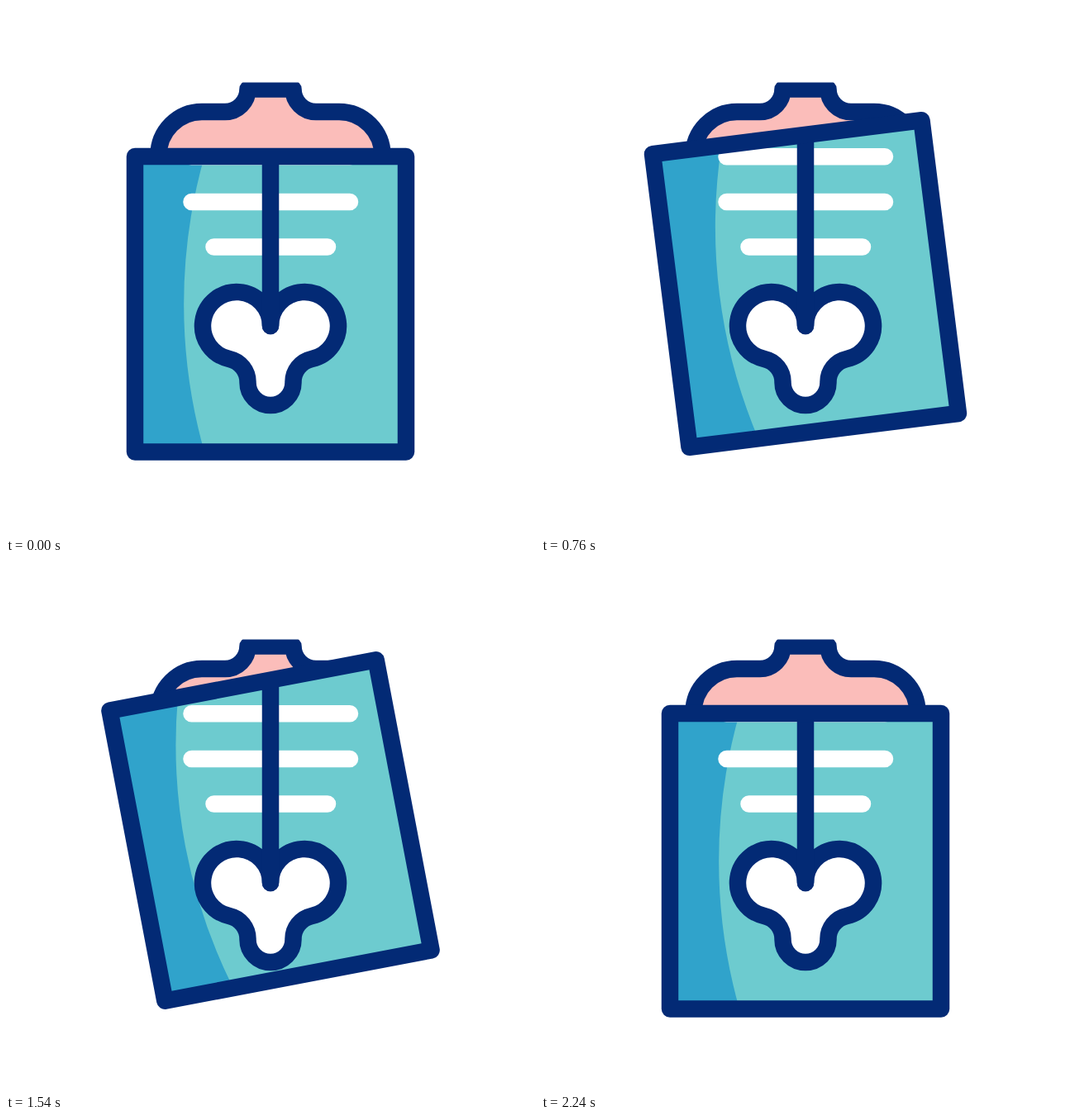
Animation, 640 px wide and 640 px high, one loop 2.4 s. Source, as an HTML page:

```html
<!DOCTYPE html>
<html lang="en">
<head>
<meta charset="utf-8">
<title>X-ray panel</title>
<style>
  html, body { margin: 0; width: 100%; height: 100%; overflow: hidden; background: #fff; }
  svg { display: block; width: 100%; height: 100%; }
  .line { fill: none; stroke: #032a75; stroke-width: 20.5; stroke-linecap: round; stroke-linejoin: round; }
  .rib { fill: none; stroke: #fff; stroke-width: 20.5; stroke-linecap: round; }
</style>
</head>
<body>
<svg viewBox="0 0 640 640">
  <defs>
    <clipPath id="neckCut"><rect y="92.5" width="640" height="548"/></clipPath>
    <clipPath id="screen"><rect class="tilt" x="-164" y="-178.75" width="328" height="357.5"/></clipPath>
  </defs>

  <g clip-path="url(#neckCut)">
    <path class="line" style="fill:#fbbdba" d="M184.5 181A52.5 53 0 0 1 237 128H265A27.5 27.5 0 0 0 292.5 100.5H347.5A27.5 27.5 0 0 0 375 128H403A52.5 53 0 0 1 455.5 181"/>
  </g>

  <g class="tilt">
    <rect x="-164" y="-178.75" width="328" height="357.5" fill="#6dcbcf"/>
    <path fill="#30a3cb" d="M-164-178.75H-80A656 656 0 0 0-80 178.75H-164Z"/>
  </g>

  <g clip-path="url(#screen)">
    <path class="rib" d="M224.5 182.3H416M224.5 237H416M251.5 291.5H389"/>
    <path class="line" style="fill:#fff" d="M320 387A41 41 0 1 0 270 427A28.5 28.5 0 0 1 292.5 455.5A27.5 27.5 0 0 0 347.5 455.5A28.5 28.5 0 0 1 370 427A41 41 0 1 0 320 387"/>
    <path class="line" d="M320 90V387"/>
  </g>

  <rect class="tilt line" x="-164" y="-178.75" width="328" height="357.5"/>
  <path id="rays" class="line"/>
</svg>
<script>
  const LOOP = 2400;
  const TILT = 11, LIFT = 38;
  const RAY = { x: 453, y: 121, inner: 46, outer: 80 };
  const tilted = document.querySelectorAll('.tilt');
  const rays = document.getElementById('rays');

  // Eased progress from 0 to 1 between two times
  function ease(t, from, to) {
    const u = Math.min(1, Math.max(0, (t - from) / (to - from)));
    return u * u * (3 - 2 * u);
  }

  function rayPath(tail, head) {
    if (head - tail < 0.001) return '';
    const radius = k => RAY.inner + (RAY.outer - RAY.inner) * k;
    const point = (angle, r) =>
      (RAY.x + r * Math.cos(angle)).toFixed(2) + ' ' + (RAY.y - r * Math.sin(angle)).toFixed(2);
    return [0, 1, 2].map(i => {
      const angle = i * Math.PI / 4;
      return 'M' + point(angle, radius(tail)) + 'L' + point(angle, radius(head));
    }).join('');
  }

  function draw(t) {
    const p = ease(t, 400, 1000) - ease(t, 1480, 2220);
    const pose = `translate(320 ${360.75 - LIFT * p}) rotate(${-TILT * p})`;
    tilted.forEach(el => el.setAttribute('transform', pose));
    rays.setAttribute('d', rayPath(ease(t, 1240, 1530), ease(t, 970, 1260)));
  }

  const start = performance.now();
  function tick() {
    draw((performance.now() - start) % LOOP);
    requestAnimationFrame(tick);
  }
  draw(0);
  requestAnimationFrame(tick);
</script>
</body>
</html>
```
